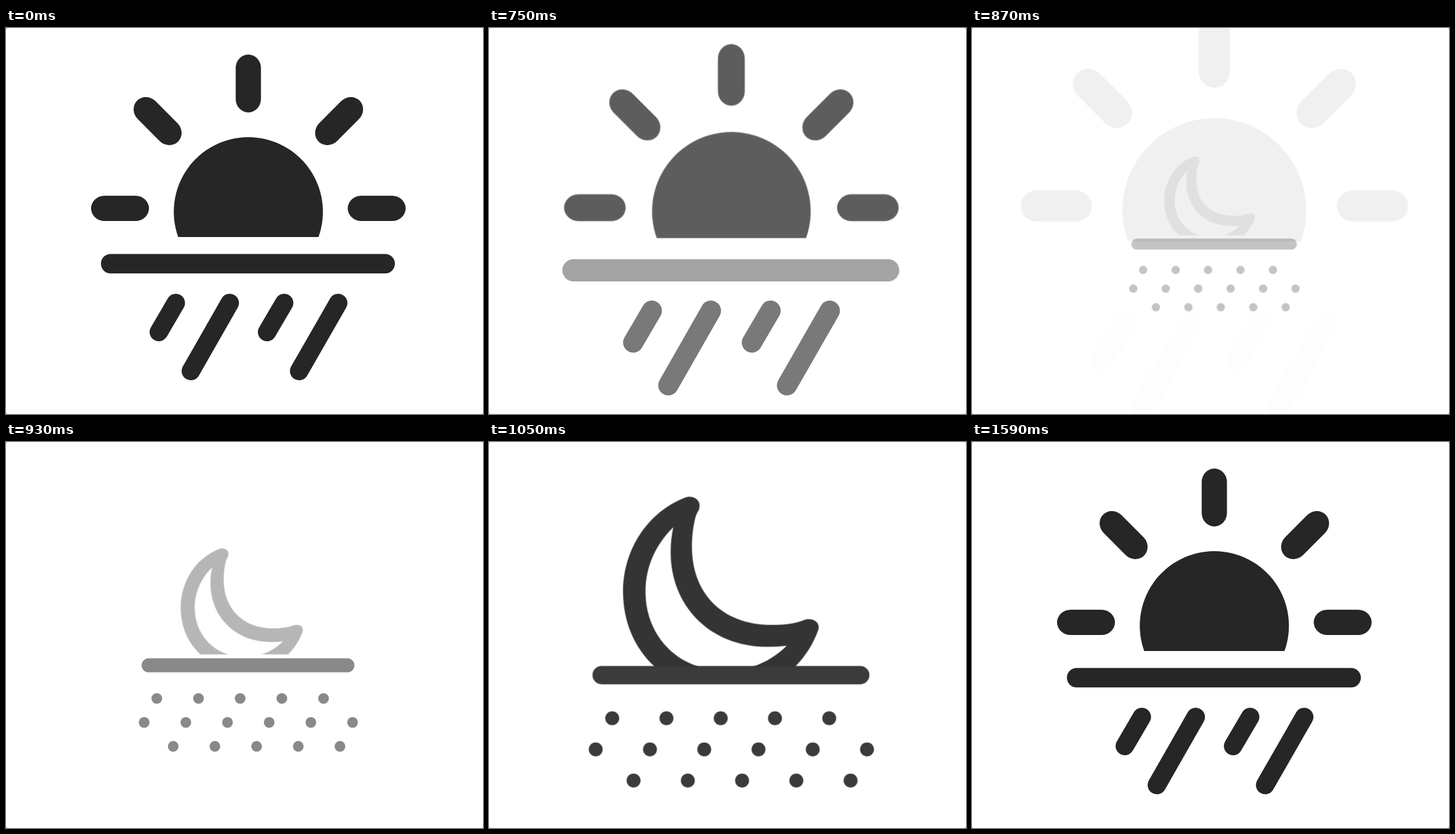
These frames come from a looping animation (774x626 px, 1650 ms). An HTML page:

```html
<!DOCTYPE html>
<html lang="en">
<head>
<meta charset="utf-8">
<title>Weather icons</title>
<style>
  html, body { margin: 0; width: 100%; height: 100%; overflow: hidden; background: #444; }
  svg { display: block; width: 774px; height: 626px; background: #fff; border-radius: 2px; }
</style>
</head>
<body>
<svg viewBox="0 0 774 626" fill="#262626">
  <defs>
    <rect id="ray" x="-20.5" y="-47" width="41" height="94" rx="20.5" ry="22"/>
    <rect id="bar" x="154" y="366.5" width="477" height="31.5" rx="15.75"/>
  </defs>
  <g id="sun">
    <path d="M279.4 339A121 121 0 1 1 507.1 339Z"/>
    <use href="#ray" transform="translate(185 292.5) rotate(90)"/>
    <use href="#ray" transform="translate(246 151) rotate(-45)"/>
    <use href="#ray" transform="translate(393.2 90)"/>
    <use href="#ray" transform="translate(540.5 151) rotate(45)"/>
    <use href="#ray" transform="translate(601.5 292.5) rotate(90)"/>
  </g>
  <g id="horizon"><use href="#bar"/></g>
  <g id="rain">
    <path d="M275.5 446L248 493M363 446L300 556.3M451.3 446L423.7 493M539 446L475.7 556.3"
      stroke="#262626" stroke-width="30" stroke-linecap="round"/>
  </g>
  <g id="moon">
    <path fill-rule="evenodd" d="M263.5 366.5C229 335 210 290 210 240C210 168 252 105 314 81
      C327 76 340 83 339.5 95C339 103 336 104 333 112C329 126 326.5 145 326.5 164
      C326.5 240 375 296 462 296C482 296 500 293.5 514 288.5C530 282 544 291 540.5 304
      C532 328 518 350 501 366.5Z
      M339 366.5C286 351 248 302 248 240C248 198 265 160 295 131C292 144 290.5 158 290.5 173
      C290.5 262 355 333 455 333C466 333 477 332.3 487 331C471 347 452 359 429 366.5Z"/>
  </g>
  <g id="snow"><use href="#bar"/></g>
</svg>
<script>
const el = id => document.getElementById(id);

// Rows of snow: first x, y, count
for (const [x, y, count] of [[188, 456.5, 5], [159.6, 510.2, 6], [224.8, 563.8, 5]]) {
  for (let i = 0; i < count; i++) {
    const dot = document.createElementNS('http://www.w3.org/2000/svg', 'circle');
    dot.setAttribute('cx', x + i * 93.45);
    dot.setAttribute('cy', y);
    dot.setAttribute('r', 12);
    el('snow').append(dot);
  }
}

const curve = (a, b, u) => 3 * a * u * (1 - u) ** 2 + 3 * b * u * u * (1 - u) + u ** 3;

const bezier = (x1, y1, x2, y2) => x => {
  let lo = 0, hi = 1;
  for (let i = 0; i < 24; i++) {
    const mid = (lo + hi) / 2;
    if (curve(x1, x2, mid) < x) lo = mid; else hi = mid;
  }
  return curve(y1, y2, lo);
};

const easeInOut = bezier(.42, 0, .58, 1);
const easeOut = x => x + .67 * x * (1 - x);

// Start and length count in steps of 30 ms; cy is the centre of scaling
const layers = [
  { id: 'sun', start: 0, length: 8.6, ease: easeInOut, cy: 309.5 },
  { id: 'horizon', start: .14, length: 6.57, ease: bezier(.3, .1, .45, 1), cy: 309 },
  { id: 'rain', start: 0, length: 7.4, ease: bezier(.42, .1, .58, 1), cy: 316 },
  { id: 'moon', start: 5.16, length: 9.6, ease: easeInOut, cy: 311.5, enters: true },
  { id: 'snow', start: 5.3, length: 9.7, ease: easeOut, cy: 309.5, enters: true }
];

function draw() {
  const t = performance.now() % 1650;
  const step = t < 690 || t >= 1590 ? 0 : Math.min(15, Math.floor((t - 690) / 30) + 1);
  for (const { id, start, length, ease, cy, enters } of layers) {
    const x = Math.min(1, Math.max(0, (step - start) / length));
    const p = x === 0 || x === 1 ? x : ease(x);
    const scale = enters ? .4 + .6 * p : 1 + .25 * p;
    el(id).setAttribute('transform',
      `translate(393.3 ${cy}) scale(${scale}) translate(-393.3 ${-cy})`);
    el(id).setAttribute('opacity', enters ? p : 1 - p);
  }
  requestAnimationFrame(draw);
}
draw();
</script>
</body>
</html>
```
